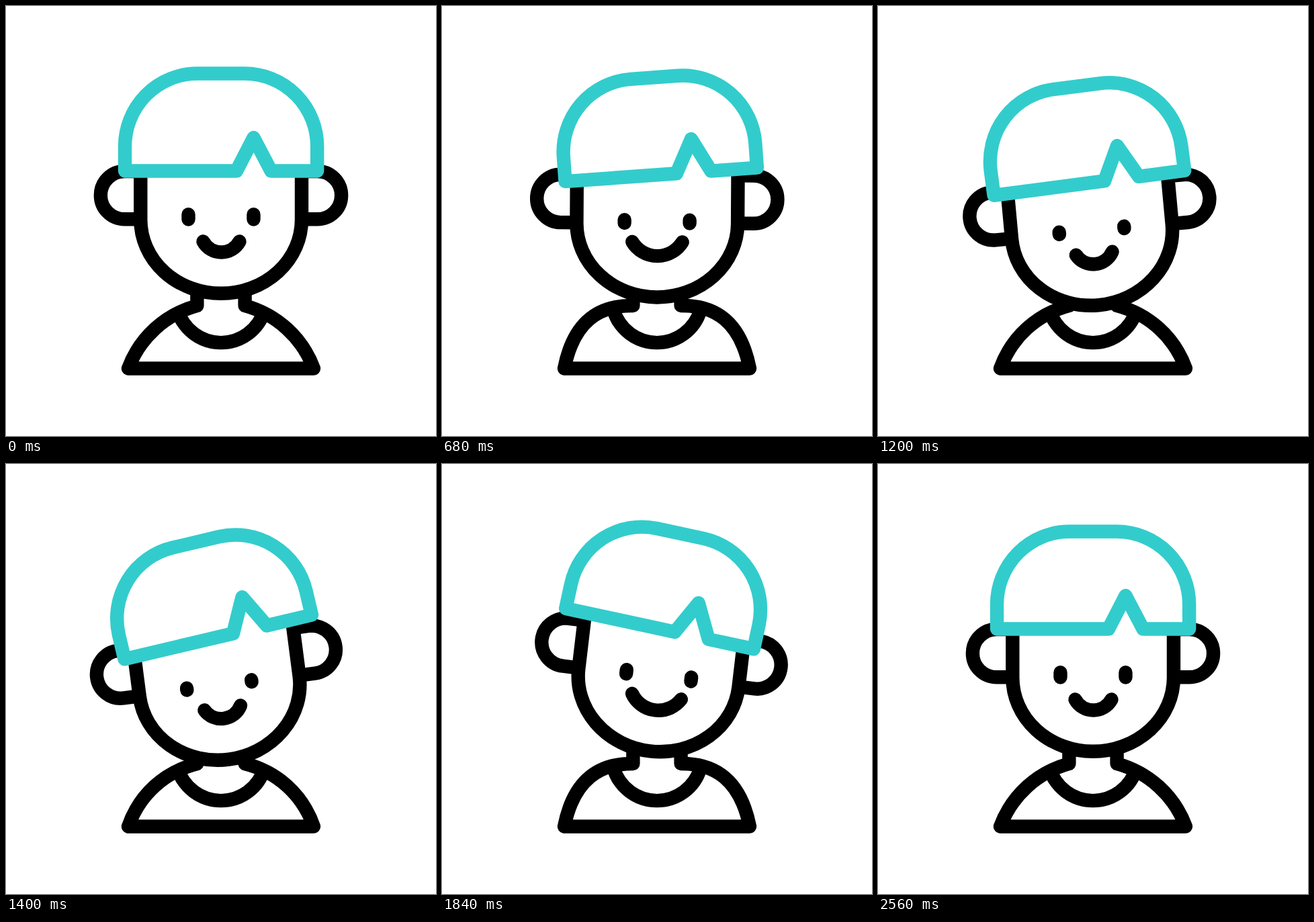
Animation, 640 px wide and 640 px high, one loop 3.6 s. Source, as an HTML page:

```html
<!DOCTYPE html>
<html lang="en">
<head>
<meta charset="utf-8">
<title>Bobbing boy</title>
<style>
html, body { margin: 0; height: 100%; overflow: hidden; background: #fff; }
svg { display: block; width: 100vw; height: 100vh; }
</style>
</head>
<body>
<svg viewBox="0 0 640 640" fill="none" stroke="#000" stroke-width="20.4" stroke-linecap="round" stroke-linejoin="round">
  <path id="body"/>
  <path d="M255.5 453A67.3 67.3 0 0 0 384.5 453" stroke-linecap="butt"/>
  <g id="head">
    <path d="M200.3 246H176.5A35 35 0 0 0 176.5 317.3H200.3M440 246H463.5A35 35 0 0 1 463.5 317.3H440"/>
    <path d="M200.3 215V318A12 11 0 0 0 440 318V215" fill="#fff"/>
    <path id="eyes"/>
    <path id="mouth"/>
    <path id="hair" fill="#fff" stroke="#3cc" d="M177 245.5H343L368.5 196L394.5 245.5H463.2V209A108 108.5 0 0 0 355.5 100.5H284.7A108 108.5 0 0 0 177 209Z"/>
  </g>
</svg>
<script>
const LOOP = 3600, ACTIVE = 2560, STEP = 20, BEATS = 3;
const $ = id => document.getElementById(id);
const ease = u => (1 - Math.cos(u * Math.PI)) / 2;
const mix = (a, b, u) => a + (b - a) * u;

// Each beat eases from one pose to the next at its turning point, then on to a third.
const swing = (turn, ...poses) => t => {
  const beat = t / ACTIVE * BEATS, k = Math.min(BEATS - 1, Math.floor(beat)), u = beat - k;
  const [from, mid, to] = poses.slice(2 * k);
  return u < turn ? mix(from, mid, ease(u / turn)) : mix(mid, to, ease((u - turn) / (1 - turn)));
};

const drop = swing(0.45, 0, 25.2, -2.8, 18.3, -2.8, 8.1, 0);
const tilt = swing(0.57, 0, -9.4, 8.5, -8.5, 9, -4, 0);
const sway = swing(0.68, 0, -8.4, 5.1, -6, 7, -5.5, 0);
const squint = swing(0.55, 0, 0.85, 0, 0.66, 0, 0.91, 0);

function draw(t) {
  const shrug = ease(t / ACTIVE * 4), grin = shrug ** 2;

  const x1 = mix(237, 235, shrug), y1 = mix(459, 445, shrug);
  const x2 = mix(199, 196, shrug), y2 = mix(493.5, 468, shrug);
  $("body").setAttribute("d", `M284.4 412V446C${x1} ${y1} ${x2} ${y2} 182 539.5H458`
    + `C${640 - x2} ${y2} ${640 - x1} ${y1} 355.6 446V412`);

  $("head").setAttribute("transform", `translate(0 ${drop(t)}) rotate(${tilt(t)} 320 337)`);
  $("hair").setAttribute("transform", `rotate(${sway(t)} 320 173)`);

  const lid = 310.3 + 7.3 * squint(t);
  $("eyes").setAttribute("d", `M271.5 ${lid}V317.6M368.5 ${lid}V317.6`);

  const w = 27 + 10.5 * grin, sag = 16 + 5 * grin;
  const r = (w * w + sag * sag) / (2 * sag), y = 366.5 - sag;
  $("mouth").setAttribute("d", `M${320.5 - w} ${y}A${r} ${r} 0 0 0 ${320.5 + w} ${y}`);
}

const start = performance.now();
function frame(now) {
  const t = Math.max(0, now - start) % LOOP;
  draw(Math.min(ACTIVE, Math.floor(t / STEP) * STEP));
  requestAnimationFrame(frame);
}
draw(0);
requestAnimationFrame(frame);
</script>
</body>
</html>
```
